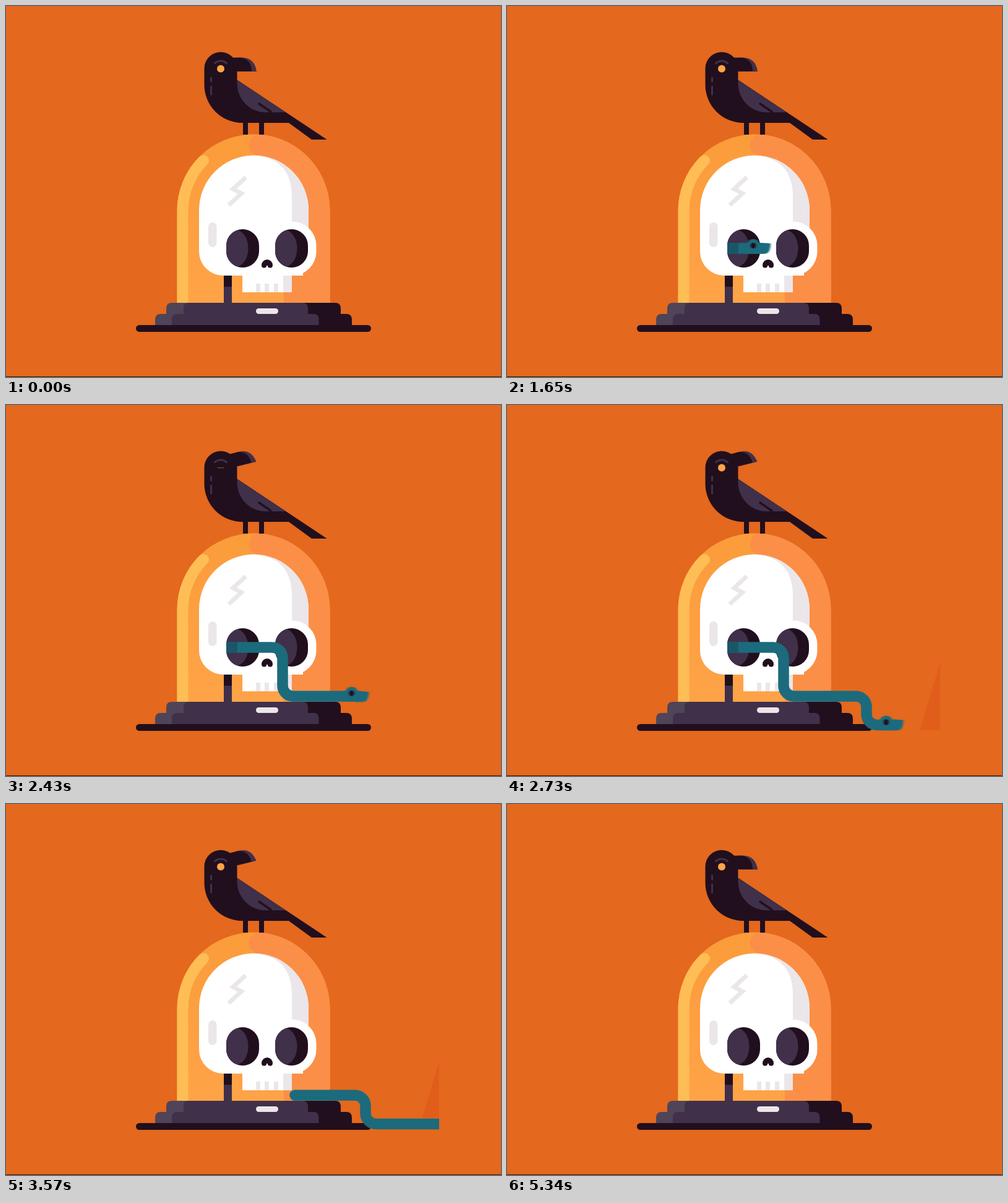
Write an HTML page that moves like this. It is 800x600 px and loops after 5400 ms.

```html
<!DOCTYPE html>
<html lang="en">
<head>
<meta charset="utf-8">
<title>Crow, skull and snake</title>
<style>
  html, body { margin: 0; width: 100%; height: 100%; overflow: hidden; background: #e4681d; }
  svg { display: block; width: 100%; height: 100%; }
  .ink { fill: #210f1e; }
  .plum { fill: #40304a; }
  .mauve { fill: #504458; }
  .mist { fill: #ebe6ea; }
  .white { fill: #fff; }
  .teal { fill: #1b6b7d; }
  .line { fill: none; stroke: #40304a; stroke-width: 3; }
</style>
</head>
<body>
<svg viewBox="0 0 800 600">
  <defs>
    <linearGradient id="glass" gradientUnits="userSpaceOnUse" x1="0" y1="207" x2="0" y2="480">
      <stop offset="0" stop-color="#fb9c3a"/>
      <stop offset="1" stop-color="#ffa348"/>
    </linearGradient>
    <clipPath id="opening">
      <rect x="356" y="361" width="53" height="62" rx="26.5"/>
      <rect x="374" y="361" width="326" height="180"/>
    </clipPath>
    <clipPath id="socketShade"><rect x="350" y="361" width="24" height="62"/></clipPath>
    <filter id="smear" x="-20%" y="-20%" width="140%" height="140%">
      <feGaussianBlur stdDeviation="1.6 0"/>
    </filter>
    <g id="socket">
      <rect class="ink" width="53" height="62" rx="26.5"/>
      <path class="plum" d="M18 1.5C30 5 35.5 18 35.5 31S30 57 18 60.5C7 57 0 47 0 35.5V26.5C0 15 7 5 18 1.5Z"/>
    </g>
  </defs>

  <rect width="800" height="600" fill="#e4681d"/>
  <rect y="599" width="800" height="1" fill="#3a1b0a"/>
  <path id="wedge" fill="#e05e1a"/>

  <!-- glass dome -->
  <path fill="url(#glass)" d="M276.500 480V331a123.500 123.500 0 0 1 247 0V480Z"/>
  <path fill="#fb8f47" d="M410 207.500A17.500 17.500 0 0 0 410 242.500Q449 270 449 331V480H523.500V331A123.500 123.500 0 0 0 410 207.500Z"/>
  <path fill="none" stroke="#ffbd55" stroke-width="18" d="M285.500 480V331A114.500 114.500 0 0 1 319 250"/>
  <circle cx="319" cy="250" r="9" fill="#ffbd55"/>

  <!-- stand -->
  <path class="plum" d="M352 454h13v27h-13z"/>
  <path class="ink" d="M352 434h13v20h-13z"/>
  <path class="mauve" d="M259 498v-9q0-9 9-9h82v18z"/>
  <path class="ink" d="M450 480h82q9 0 9 9v9h-91z"/>
  <path class="plum" d="M287 498v-10q0-8 8-8H479q9 0 9 9v9z"/>
  <path class="mauve" d="M241 516v-9q0-9 9-9h90v18z"/>
  <path class="ink" d="M450 498h100q9 0 9 9v9H450z"/>
  <path class="plum" d="M268 516v-9q0-9 9-9H497q8.500 0 8.500 9v9z"/>
  <rect class="mist" x="404" y="489" width="36" height="9" rx="4.500"/>
  <rect class="ink" x="210" y="516" width="380" height="11" rx="5.500"/>

  <!-- skull -->
  <path class="white" d="M312 330a88.500 88.500 0 0 1 177 0V436H351a39 39 0 0 1-39-39Z"/>
  <path class="mist" d="M400 242A88.500 88.500 0 0 1 489 330V375H462V307Q461 246 400 242Z"/>
  <rect fill="#fb8f47" x="480" y="405" width="20" height="40"/>
  <path class="white" d="M430 348.500H462A39 39 0 0 1 501.500 388V397A39 39 0 0 1 462 436V463H382V430Z"/>
  <path class="mist" d="M448 436h14v27h-14zM404 449h7v14h-7zM418 449h7v14h-7zM433 449h7v14h-7z"/>
  <rect class="mist" x="327" y="350" width="13.500" height="40" rx="6.750"/>
  <path fill="none" stroke="#ebe6ea" stroke-width="7" d="M387.500 277L367 296L380.500 303L360 322"/>
  <use href="#socket" x="356" y="361"/>
  <use href="#socket" x="435" y="361"/>
  <path class="ink" d="M413 419a9 9 0 0 1 18 0q0 4.500-4 4.500t-4-3q-1-2-2 0 0 3-4 3t-4-4.500z"/>

  <!-- crow -->
  <path class="ink" d="M383 185h8v23h-8zM409 185h8v23h-8z"/>
  <path class="ink" d="M320.500 101a26.500 26.500 0 0 1 53 0V119.500L518.500 216H494L457 189H382A61.500 61.500 0 0 1 320.500 127.500Z"/>
  <path class="plum" d="M373.500 119.500L452 172H420A46.500 46.500 0 0 1 373.500 125.500Z"/>
  <path fill="none" stroke="#210f1e" stroke-width="3.500" stroke-linecap="round" d="M409 158L428 171"/>
  <path class="line" stroke-linecap="round" d="M337.500 92.500Q347 85 356.500 92.500M331.500 116v6M331.500 130v13"/>
  <g id="beak">
    <path class="plum" d="M374 83.500H382Q402 84 405 106H374Z"/>
    <path class="ink" d="M363 83.500H380Q397 87 397 105.500H370Z"/>
  </g>
  <ellipse id="eye" cx="347" cy="101.500" rx="6" ry="6" fill="#ffa446"/>

  <!-- snake -->
  <g id="snake" clip-path="url(#opening)">
    <path class="body" fill="none" stroke="#1b6b7d" stroke-width="17.500"/>
    <circle id="tail" class="teal" r="8.750"/>
    <g id="head" filter="url(#smear)">
      <circle class="teal" cx="-6" cy="-4" r="11"/>
      <path class="teal" d="M-16-8.750H10Q17-8.500 22-8Q22 8.750 12 8.750H-16Z"/>
      <circle class="ink" cx="-6" cy="-4.500" r="4.800"/>
    </g>
    <path class="body" fill="none" stroke="#1a5667" stroke-width="17.500" clip-path="url(#socketShade)"/>
  </g>
</svg>

<script>
const LOOP = 5400, STEP = 30;
const ROUTE = 'M330 392H430A17 17 0 0 1 447 409V454A17 17 0 0 0 464 471H564' +
  'A17 17 0 0 1 581 488V500.5A17 17 0 0 0 598 517.5H760';
const $ = id => document.getElementById(id);
const [snake, head, tail, beak, eye, wedge] =
  ['snake', 'head', 'tail', 'beak', 'eye', 'wedge'].map($);
const bodies = [...document.querySelectorAll('.body')];
bodies.forEach(b => b.setAttribute('d', ROUTE));
const route = bodies[0];
const total = route.getTotalLength();

const clamp = (v, a, b) => Math.min(b, Math.max(a, v));
const progress = (t, from, to) => clamp((t - from) / (to - from), 0, 1);
const ease = p => p < .5 ? 4 * p ** 3 : 1 - 4 * (1 - p) ** 3;
const blink = (t, from, to) => Math.sin(Math.PI * progress(t, from, to));

// The snout darts out of the socket, then travels at an even pace.
function snoutAt(t) {
  return t < 1560 ? 26 + 44 * progress(t, 1470, 1560) : 96 + .288 * (t - 1650);
}

function drawSnake(t) {
  const visible = t >= 1500 && t < 4470;
  snake.style.display = visible ? '' : 'none';
  if (!visible) return;

  const snout = snoutAt(t);
  const end = clamp(201.4 + .307 * (t - 3570), 0, total);
  const front = clamp(snout - 12, end, total);
  bodies.forEach(b => {
    b.setAttribute('stroke-dasharray', `${front - end} ${total * 2}`);
    b.setAttribute('stroke-dashoffset', -end);
  });

  const tip = route.getPointAtLength(end);
  tail.setAttribute('cx', tip.x);
  tail.setAttribute('cy', tip.y);

  const s = snout - 22;
  const p = route.getPointAtLength(clamp(s, 0, total));
  const a = route.getPointAtLength(clamp(s - 3, 0, total - 6));
  const b = route.getPointAtLength(clamp(s + 3, 6, total));
  const angle = Math.atan2(b.y - a.y, b.x - a.x) * 180 / Math.PI;
  const x = p.x + Math.min(0, s);
  head.setAttribute('transform', `translate(${x} ${p.y}) rotate(${angle})`);
  head.style.display = s < total ? '' : 'none';
}

function draw(t) {
  const lift = ease(progress(t, 2010, 2340)) - ease(progress(t, 5160, 5340));
  beak.setAttribute('transform', `rotate(${-14 * lift} 347 101)`);
  const shut = Math.max(blink(t, 2340, 2520), blink(t, 4500, 4680));
  eye.setAttribute('ry', 6 * (1 - .95 * shut));

  wedge.style.display = t >= 2670 && t < 4470 ? '' : 'none';
  wedge.setAttribute('d', t < 2940 ? 'M667 526L700 417V526Z' : 'M672.500 508L700 417V508Z');
  drawSnake(t);
}

function tick(now) {
  draw(Math.floor(now % LOOP / STEP) * STEP);
  requestAnimationFrame(tick);
}
draw(0);
requestAnimationFrame(tick);
</script>
</body>
</html>
```
